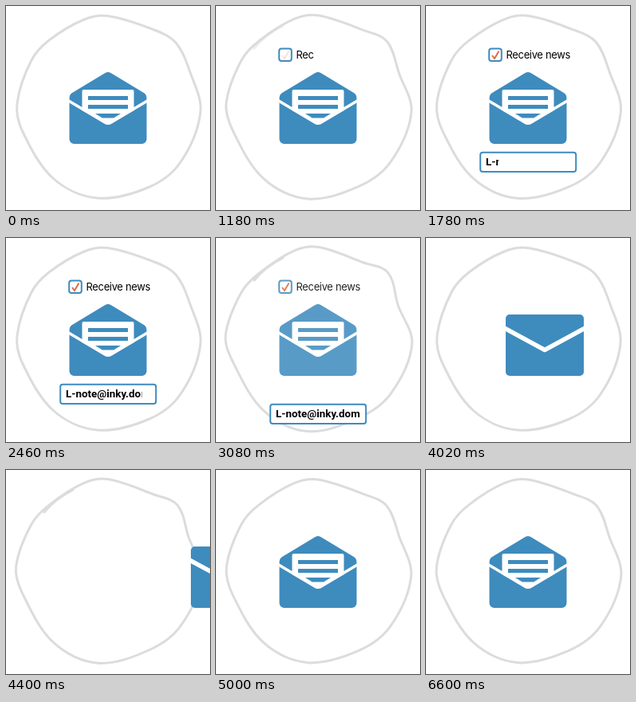
These frames come from a looping animation (256x256 px, 6620 ms). An HTML page:

```html
<!DOCTYPE html>
<html lang="en">
<head>
<meta charset="utf-8">
<title>Newsletter envelope</title>
<style>
  html, body { margin: 0; width: 100%; height: 100%; overflow: hidden; background: #fff; }
  svg { display: block; width: 100vw; height: 100vh; }
  .blue { fill: #3c8dbc; fill: #3e8bbe; }
  .line { fill: #fff; stroke: #3e8bbe; stroke-width: 2; }
  .gap { fill: none; stroke: #fff; stroke-linejoin: round; }
  .ring { fill: none; stroke: #dcdcdc; stroke-width: 3; stroke-linecap: round; }
  .label { font: 400 13px Inter, sans-serif; letter-spacing: -0.35px; }
  .mail { font: 700 13.4px Roboto, sans-serif; }
</style>
</head>
<body>
<svg viewBox="0 0 256 256">
  <defs>
    <clipPath id="labelClip"><rect id="labelMask" x="100" y="48" width="0" height="26"/></clipPath>
    <clipPath id="mailClip"><rect id="mailMask" x="74" y="184" width="0" height="24"/></clipPath>
  </defs>

  <path id="ring" class="ring"/>
  <path id="smudge" class="ring" d="M48 53Q62 36 84 25"/>

  <g id="open">
    <path class="blue" d="M79.5 116Q79.5 111 83 109L124.5 84Q128 82 131.5 84L173 109Q176.5 111 176.5 116V167a6 6 0 0 1-6 6H85.5a6 6 0 0 1-6-6Z"/>
    <path fill="#fff" d="M95.5 107a2 2 0 0 1 2-2H158.5a2 2 0 0 1 2 2V131L128 149L95.5 131Z"/>
    <path class="blue" d="M103 113h50v5h-50ZM103 124h50v5h-50ZM112 135h32l-8 5q-1 .5-2 .5h-12q-1 0-2-.5Z"/>
    <path class="gap" stroke-width="3.6" d="M77 118L124 146Q128 148.5 132 146L179 118"/>
  </g>

  <g id="closed">
    <rect class="blue" x="79.5" y="96" width="98" height="77" rx="5"/>
    <path class="gap" stroke-width="5.5" d="M76 112L128.5 140.5L181 112"/>
  </g>

  <g id="option">
    <rect class="line" x="79.2" y="53.5" width="15.6" height="15.4" rx="3"/>
    <path id="tick" fill="none" stroke="#e2683c" stroke-width="2" d="M83 62L86 66L91.5 56.5"/>
    <text class="label" x="100.5" y="66" clip-path="url(#labelClip)">Receive news</text>
  </g>

  <g id="field">
    <rect class="line" x="68.2" y="183.7" width="120" height="24.3" rx="3"/>
    <text class="mail" x="75" y="199.5" clip-path="url(#mailClip)">L-note@inky.dom</text>
  </g>
</svg>
<script>
const LOOP = 6620, STEP = 20, POSE = 200;
const CENTER = [129, 127], RADIUS = 113.5;
const el = id => document.getElementById(id);
const ramp = (t, a, b) => Math.min(1, Math.max(0, (t - a) / (b - a)));
const mix = (a, b, p) => a + (b - a) * p;
const fade = (id, v) => el(id).setAttribute("opacity", v.toFixed(3));
const shift = (id, x, y) => el(id).setAttribute("transform", `translate(${x} ${y})`);
const reveal = (id, w) => el(id).setAttribute("width", w);

// Hand-drawn ring: key points, and how far each pose exaggerates its bumps
const knots = [
  [128, 12.5], [186, 30], [213, 46], [231, 83], [244, 133], [219, 196], [180, 227],
  [115, 241], [60, 217], [21, 158], [14, 122], [32, 68], [54, 43], [98, 17]
];
const bumps = [1, 1.5, 1.9, 2.2];

function bend([x, y], gain) {
  const dx = x - CENTER[0], dy = y - CENTER[1], r = Math.hypot(dx, dy);
  const k = (RADIUS + (r - RADIUS) * gain) / r;
  return [CENTER[0] + dx * k, CENTER[1] + dy * k];
}

// Closed curve whose handles are a third of each segment long
function smooth(pts) {
  const n = pts.length, at = i => pts[(i + n) % n];
  const tangent = i => {
    const [a, b] = [at(i - 1), at(i + 1)];
    return Math.atan2(b[1] - a[1], b[0] - a[0]);
  };
  const handle = ([x, y], angle, len) => [x + Math.cos(angle) * len, y + Math.sin(angle) * len];
  return pts.reduce((d, p, i) => {
    const q = at(i + 1), len = Math.hypot(q[0] - p[0], q[1] - p[1]) / 3;
    return d + `C${handle(p, tangent(i), len)} ${handle(q, tangent(i + 1), -len)} ${q}`;
  }, "M" + pts[0]) + "Z";
}

function drawRing(t) {
  const s = t + STEP, k = Math.floor(s / POSE);
  const p = k > 0 && s % POSE < STEP ? 0.5 : 1;
  const to = k % 4, from = (k + 3) % 4;
  const gain = mix(bumps[from], bumps[to], p);
  el("ring").setAttribute("d", smooth(knots.map(pt => bend(pt, gain))));
  fade("smudge", mix(+(from > 1), +(to > 1), p));
}

function draw(t) {
  drawRing(t);

  const out = ramp(t, 3020, 3440);
  fade("open", t < 3800 ? 1 - out : ramp(t, 4400, 4560));
  fade("closed", t < 4480 ? ramp(t, 3200, 3440) : 0);
  shift("closed", 20.5 * (Math.max(0, t - 3800) / 220) ** 2, 0);

  fade("option", ramp(t, 960, 1100) * (1 - out));
  fade("tick", ramp(t, 1100, 1500));
  reveal("labelMask", 82 * ramp(t, 1000, 1640));

  fade("field", t < 3440 ? ramp(t, 1540, 1680) : 0);
  reveal("mailMask", 1 + 107 * ramp(t, 1640, 2560));
  shift("field", 0, 25 * (Math.max(0, t - 2800) / 280) ** 2);
}

const start = performance.now();
function tick() {
  const t = (performance.now() - start) % LOOP;
  draw(Math.floor(t / STEP) * STEP);
  requestAnimationFrame(tick);
}
tick();
</script>
</body>
</html>
```
